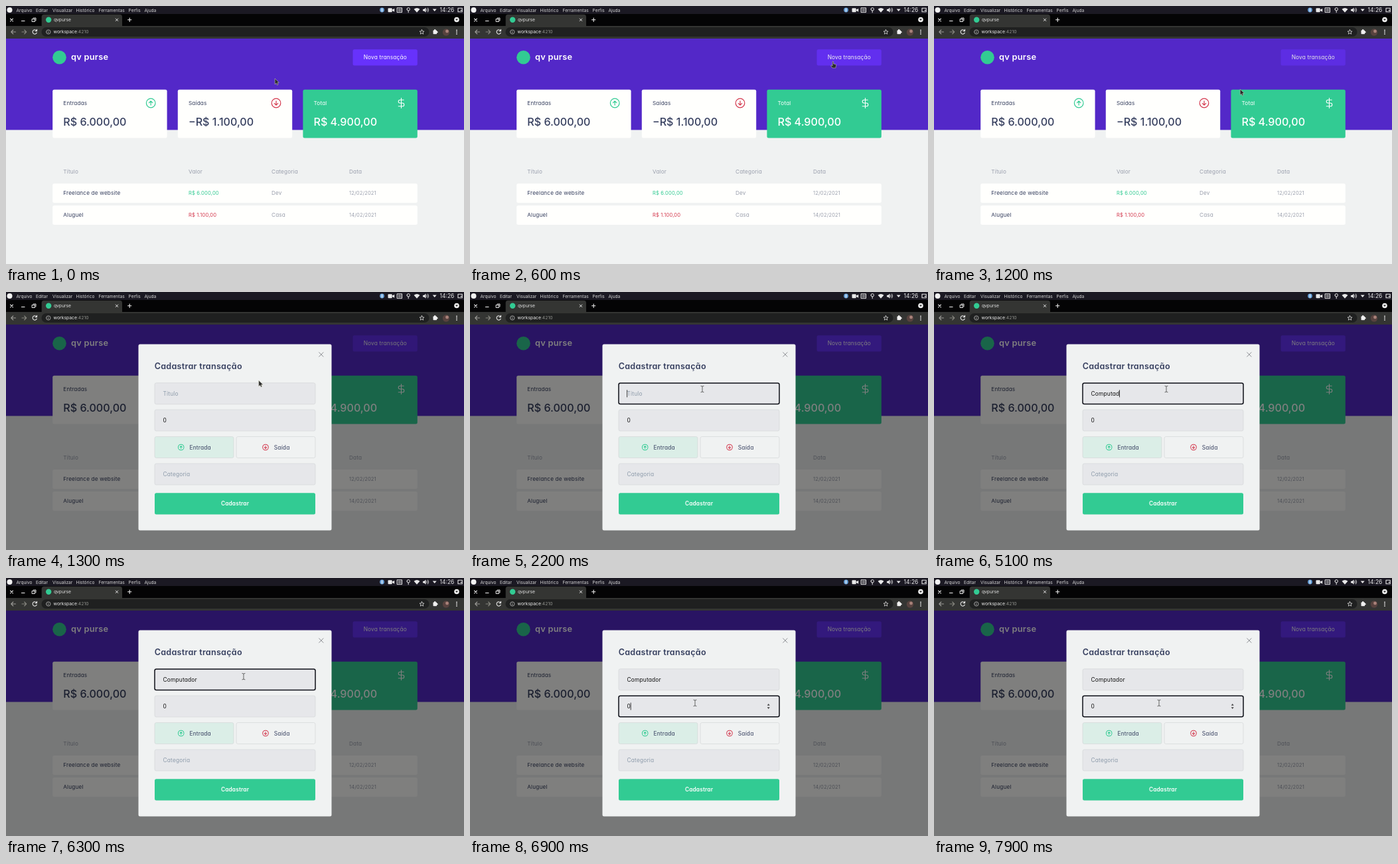
An HTML page for the animation above (8000 ms loop, 690 by 388 pixels).

```html
<!DOCTYPE html>
<html lang="pt">
<head>
<meta charset="utf-8">
<style>
  html, body { margin: 0; width: 100%; height: 100%; overflow: hidden; background: #f0f2f2; }
  svg { display: block; width: 100vw; height: 100vh; }
  text { font-family: Inter, "Open Sans", sans-serif; white-space: pre; }
  .app text { letter-spacing: .02em; font-feature-settings: "cv11"; }
  .app .amount { letter-spacing: 0; font-weight: 500; }
  .line { fill: none; stroke-linecap: round; stroke-linejoin: round; }
</style>
</head>
<body>
<svg id="stage" viewBox="0 0 690 388" preserveAspectRatio="none"></svg>
<script>
const GREEN = '#32cb93', RED = '#d3364c', INK = '#363f5f', MUTED = '#9a9fad', PALE = '#e9e9ea';
const LOOP = 8000, BLINK = 600, WORD = 'Computador';

const text = (x, y, s, size, fill, extra = '') =>
  `<text x="${x}" y="${y}" font-size="${size}" fill="${fill}" ${extra}>${s}</text>`;
const rect = (x, y, w, h, fill, r = 0, extra = '') =>
  `<rect x="${x}" y="${y}" width="${w}" height="${h}" rx="${r}" fill="${fill}" ${extra}/>`;
const disc = (x, y, r, fill) => `<circle cx="${x}" cy="${y}" r="${r}" fill="${fill}"/>`;
const line = (d, color, w = 1, extra = '') =>
  `<path class="line" d="${d}" stroke="${color}" stroke-width="${w}" ${extra}/>`;
const cross = (x, y, r, color, w) =>
  line(`M${x - r} ${y - r}l${2 * r} ${2 * r}m0 ${-2 * r}l${-2 * r} ${2 * r}`, color, w);

// Circled arrow, pointing up (dir 1) or down (dir -1)
const arrowIcon = (x, y, r, dir, color, w) =>
  `<g transform="translate(${x} ${y}) scale(${r} ${r * dir})">` +
  line('M-1 0A1 1 0 1 1 1 0A1 1 0 1 1 -1 0M0 .45V-.42M-.4 -.05L0 -.45L.4 -.05', color, w / r) + '</g>';

const menuBar = () => rect(0, 0, 690, 12, '#1b1923') + disc(5.5, 6, 4, '#f2f2f2') +
  [[15.5, 'Arquivo'], [45, 'Editar'], [70, 'Visualizar'], [105.5, 'Histórico'],
   [139.5, 'Ferramentas'], [184.5, 'Perfis'], [208.5, 'Ajuda']]
    .map(([x, s]) => text(x, 8.6, s, 6.6, '#d8d8d8')).join('') +
  text(653.5, 9.2, '14:26', 8.5, PALE) +
  disc(566.5, 6, 3.4, '#6ea5dc') + line('M566.5 4v4', '#fff', 1) +
  rect(575.5, 3.2, 6.2, 6, PALE, 1) + `<path d="M582 5.5l3.2-1.8v5l-3.2-1.8z" fill="${PALE}"/>` +
  line('M589.5 2.8h7v6.8h-7zM591 5h4M591 7.3h4', PALE, 1) +
  line('M606.2 9.8V7.2M604 4.8a2.2 2.2 0 1 1 4.4 0a2.2 2.2 0 1 1-4.4 0', PALE, 1) +
  `<path d="M614.5 4.8q4.5-3.6 9 0l-4.5 5z" fill="${PALE}"/>` +
  `<path d="M628 4.7h2l2.5-2.2v7.2L630 7.5h-2z" fill="${PALE}"/>` +
  line('M634 4.5q1.3 1.5 0 3M635.6 3q2.4 3 0 6', PALE, .9) +
  `<path d="M642.7 4.5h6l-3 3.6z" fill="${PALE}"/>` +
  line('M681 3.2h6.2v5.6H681zM685 6.5h2', PALE, 1.1);

const browser = () => rect(0, 12, 690, 18, '#040405') +
  cross(8.5, 21, 1.9, '#fff', 1.1) + line('M23.5 22.5h4.5', '#fff', 1.1) +
  line('M39.5 19.5h4v4h-4zM41 18h4v4', '#fff', .9) +
  rect(53.7, 12.8, 121.3, 20, '#343533', 3.5) +
  disc(64.2, 20.8, 4.2, GREEN) + text(72, 23.2, 'qvpurse', 6.7, '#e4e4e4') +
  cross(167, 20.8, 1.8, '#eee', .9) + line('M183.5 20.8h5.4M186.2 18.1v5.4', '#eee', 1.1) +
  disc(679, 20.5, 3.8, '#f0f0f0') + '<path d="M677 19.6h4l-2 2.4z" fill="#222"/>' +
  rect(0, 30, 690, 19, '#343533') + rect(53.5, 32, 584, 14, '#1f2020', 7) +
  line('M14.5 39H8M10.8 36L7.8 39L10.8 42', '#9b9b97', 1.1) +
  line('M24 39h6.5M27.7 36L30.7 39L27.7 42', '#85857f', 1.1) +
  line('M46 37.2A3.2 3.2 0 1 0 46.3 40.2M46.5 35.2v2.5h-2.5', '#eee', 1.1) +
  line('M60.6 39a3.2 3.2 0 1 1 6.4 0a3.2 3.2 0 1 1-6.4 0M63.8 38.8v1.8M63.8 37.2v.1', '#bbb', .8) +
  text(71.5, 41.4, 'workspace<tspan fill="#92938f">:4210</tspan>', 6.8, '#eee') +
  line('M626.5 35.6l1 2.3 2.5.2-1.9 1.6.6 2.5-2.2-1.3-2.2 1.3.6-2.5-1.9-1.6 2.5-.2z', '#ddd', .8) +
  rect(643.5, 36.5, 5.6, 5.8, '#f0f0f0', .8) + disc(646.2, 36.4, 1.3, '#f0f0f0') + disc(649.3, 39.3, 1.3, '#f0f0f0') +
  disc(663, 39.5, 5.2, '#57423f') + disc(664.5, 38, 2.4, '#a9827a') +
  [36.5, 39.2, 41.9].map(y => disc(679, y, .9, '#eee')).join('');

const card = (x, fill, ink, title, amount, icon) => rect(x, 125.8, 172.4, 72.7, fill, 2.5) +
  text(x + 16.1, 149, title, 8.2, ink) +
  text(x + 16.1, 180.1, amount, 16.1, ink, 'class="amount"') + icon;

const row = (y, title, value, color, category, date) => rect(70.2, y, 549.6, 29, '#fffffd', 2.5) +
  text(86.3, y + 17.4, title, 8.2, INK) + text(275, y + 17.4, value, 7.6, color) +
  text(400, y + 17.4, category, 8.2, MUTED) + text(517, y + 17.4, date, 7.5, MUTED);

const page = () => rect(0, 48, 690, 340, '#f0f2f2') + rect(0, 48, 690, 138.4, '#5328c8') +
  disc(80.5, 77.2, 10.3, GREEN) + text(98, 81.4, 'qv purse', 12.8, '#fff', 'font-weight="600"') +
  rect(522.5, 65.3, 97.3, 24.2, '#6732fc', 2.5) +
  text(571.3, 80.4, 'Nova transação', 8.3, '#fff', 'text-anchor="middle"') +
  rect(522.5, 65.3, 97.3, 24.2, '#000', 2.5, 'id="hover" opacity="0"') +
  card(70.2, '#fffffd', INK, 'Entradas', 'R$ 6.000,00', arrowIcon(218.2, 146, 6.8, 1, GREEN, 1.2)) +
  card(258.8, '#fffffd', INK, 'Saídas', '−R$ 1.100,00', arrowIcon(407, 146, 6.8, -1, RED, 1.2)) +
  card(447.4, GREEN, '#fff', 'Total', 'R$ 4.900,00',
    line('M595.5 138.5v15M599.2 141.2h-5.4q-2.6 0-2.6 2.4t2.6 2.4h3.4q2.6 0 2.6 2.4t-2.6 2.4h-6', '#fff', 1.1)) +
  [[86.3, 'Título'], [275, 'Valor'], [400, 'Categoria'], [517, 'Data']]
    .map(([x, s]) => text(x, 251.7, s, 8.2, MUTED)).join('') +
  row(267, 'Freelance de website', 'R$ 6.000,00', GREEN, 'Dev', '12/02/2021') +
  row(300, 'Aluguel', 'R$ 1.100,00', RED, 'Casa', '14/02/2021');

const box = (x, y, w, fill) => rect(x, y, w, 32, fill, 2.5, 'stroke="#d5d7d8" stroke-width=".7"');
const modal = () => '<g id="modal">' + rect(0, 48, 690, 340, '#000', 0, 'opacity=".5"') +
  rect(199.5, 78.5, 291, 280, '#f0f2f2', 2.5) + cross(474.8, 94, 3.2, '#8b8d92', 1) +
  text(223.7, 115.9, 'Cadastrar transação', 12.6, INK, 'font-weight="600"') +
  [136.7, 177, 258].map(y => box(224, y, 242, '#e6e7ea')).join('') +
  text(236.5, 155.8, 'Título', 8.4, '#8e9cab', 'id="hint"') +
  text(236.5, 155.8, '', 8.4, '#111', 'id="typed"') +
  text(236.5, 196, '0', 8.4, '#111', 'id="zero"') +
  text(236.5, 277, 'Categoria', 8.4, '#8e9cab') +
  `<path id="spinner" d="M447.7 191.7l2-2.8 2 2.8zM447.7 194.3l2 2.8 2-2.8z" fill="#444"/>` +
  box(224, 217.5, 119, '#dbeee7') + box(347, 217.5, 119, 'none') +
  arrowIcon(263.7, 233.5, 4.3, 1, GREEN, 1) + text(276.5, 236.6, 'Entrada', 8.4, INK) +
  arrowIcon(391, 233.5, 4.3, -1, RED, 1) + text(403.8, 236.6, 'Saída', 8.4, INK) +
  rect(224, 302.2, 242, 32.2, GREEN, 2.5) +
  text(345, 321.4, 'Cadastrar', 8.3, '#fff', 'text-anchor="middle" font-weight="600"') +
  rect(224, 0, 242, 31.6, 'none', 2.5, 'id="ring" stroke="#10121a" stroke-width="1.5"') +
  rect(0, 0, .8, 11, '#111', 0, 'id="caret"') + '</g>';

const pointers = '<g id="pointer">' +
  '<path id="arrow" d="M0 0V8.8L2 7.1L3.4 10L4.9 9.3L3.6 6.5L6.2 6.2Z" fill="#2a2a2a" stroke="#d8d8c4" stroke-width=".5"/>' +
  '<path id="hand" d="M-.8 0Q0-1 .8 0V3.4L4 4.1Q5 4.4 4.8 5.6L4 9.5H-.9L-3.2 6.2Q-3 4.8-1.8 5.6L-.8 6.4Z" fill="#2a2a2a" stroke="#d8d8c4" stroke-width=".5"/>' +
  line('M-2 -4.7Q0 -4.7 0 -3.7Q0 -4.7 2 -4.7M0 -3.7V3.7M-2 4.7Q0 4.7 0 3.7Q0 4.7 2 4.7', '#555', .9, 'id="beam"') + '</g>';

const $ = id => document.getElementById(id);
$('stage').innerHTML = '<g class="app">' + page() + modal() + '</g>' + menuBar() + browser() + pointers;

// Pointer stops: time, x, y
const stops = [[0, 405, 109], [200, 428, 106], [500, 530, 86], [800, 580, 79], [1000, 576, 81],
  [1100, 532, 95], [1200, 462, 125], [1300, 381, 133], [1400, 358, 139], [1600, 348, 145], [1800, 350, 146],
  [5800, 350, 146], [6100, 358, 148], [6300, 358, 148], [6500, 350, 172], [6700, 339, 188], [LOOP, 339, 188]];
const keys = [2700, 3900, 4100, 4200, 4400, 4800, 4900, 5100, 5300, 5400];
const OPEN = 1300, FOCUS = 2100, NEXT = 6900;

const clamp = v => Math.max(0, Math.min(1, v));
const show = (id, on) => $(id).setAttribute('visibility', on ? 'inherit' : 'hidden');
const inside = (x, y, l, t, r, b) => x >= l && x <= r && y >= t && y <= b;

function pointerAt(t) {
  const i = stops.findIndex(s => s[0] > t), a = stops[i - 1], b = stops[i];
  const k = (t - a[0]) / (b[0] - a[0]);
  return [a[1] + (b[1] - a[1]) * k, a[2] + (b[2] - a[2]) * k];
}

function draw(t) {
  const [x, y] = pointerAt(t), open = t >= OPEN;
  const onFirst = inside(x, y, 224, 136.7, 466, 168.7), onSecond = inside(x, y, 224, 177, 466, 209);
  const beam = open && (onFirst || onSecond);
  const hand = !open && inside(x, y, 522.5, 65.5, 620, 89.5);
  $('pointer').setAttribute('transform', `translate(${x} ${y})`);
  show('beam', beam);
  show('hand', hand);
  show('arrow', !beam && !hand);
  $('hover').setAttribute('opacity', .1 * (clamp((t - 500) / 200) - clamp((t - 1200) / 200)));

  const count = keys.filter(k => k <= t).length, second = t >= NEXT;
  $('modal').setAttribute('visibility', open ? 'visible' : 'hidden');
  $('typed').textContent = WORD.slice(0, count);
  show('hint', !count);
  show('spinner', second || onSecond);
  show('ring', t >= FOCUS);
  $('ring').setAttribute('y', second ? 177.2 : 136.9);

  // The caret restarts its blink on every key and focus change
  const since = second ? NEXT : count ? keys[count - 1] : FOCUS;
  const width = second ? $('zero').getComputedTextLength() : count ? $('typed').getComputedTextLength() : 0;
  show('caret', t >= FOCUS && Math.floor((t - since) / BLINK) % 2 === 0);
  $('caret').setAttribute('x', 236.3 + width);
  $('caret').setAttribute('y', second ? 187.5 : 147.3);
}

function tick() {
  draw(performance.now() % LOOP);
  requestAnimationFrame(tick);
}
tick();
</script>
</body>
</html>
```
